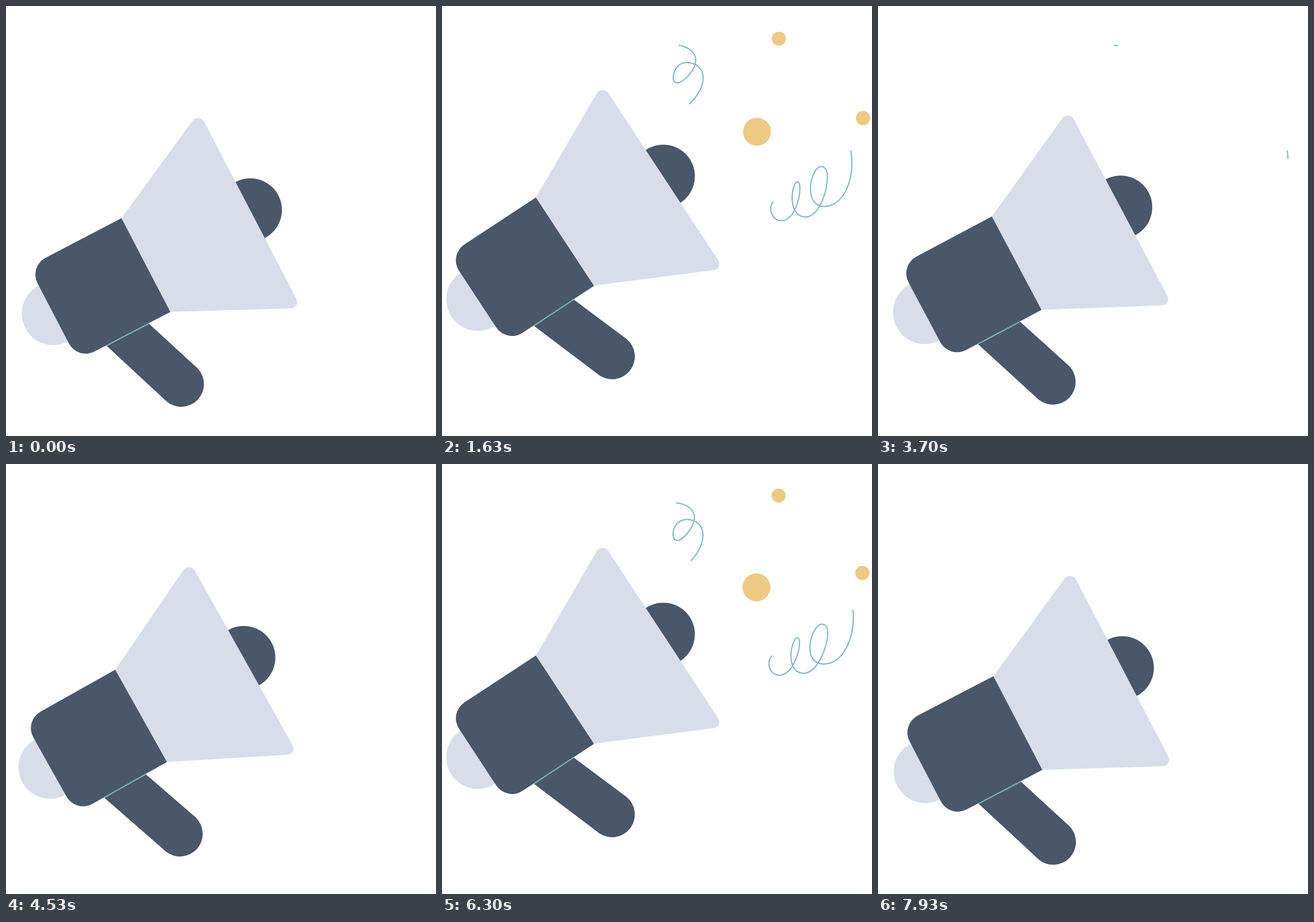
Recreate the animation shown at these times as an HTML page. Size 748x748 px, loop 8010 ms.

```html
<!DOCTYPE html>
<html lang="en">
<head>
<meta charset="utf-8">
<title>Megaphone</title>
<style>
  html, body { margin: 0; width: 100%; height: 100%; overflow: hidden; background: #fff; }
  svg { display: block; width: 100%; height: 100%; }
  .dark { fill: #4a5669; }
  .light { fill: #d8dde9; }
  .dot { fill: #edc985; }
  .ribbon { fill: none; stroke: #7db2c4; stroke-width: 2; }
  .seam { stroke: #7ab0b9; stroke-width: 2.2; }
</style>
</head>
<body>
<svg viewBox="0 0 748 748">
  <g id="horn">
    <circle class="light" cx="82.5" cy="535" r="55"/>
    <circle class="dark" cx="425" cy="354.7" r="55"/>
    <path class="dark" d="M175 591 L279.5 688 A39.5 39.5 0 0 0 333 630 L248 552 Z"/>
    <path class="dark" transform="translate(201 369) rotate(62.46)"
      d="M0 0 H184 V149 a33 33 0 0 1 -33 33 H33 a33 33 0 0 1 -33 -33 Z"/>
    <path class="seam" d="M174.5 591 L249 552"/>
    <path class="light" d="M201 369 L324.5 199.5 A11.8 11.8 0 0 1 344.5 201
      L505.5 510 A11.2 11.2 0 0 1 497 526 L286 532 Z"/>
  </g>
  <path id="curl" class="ribbon" pathLength="1" d="M433 168.5 C447 153 454 139 454 123
    C454 107 442 96.5 426 96.5 C411 96.5 402 109 402 122 C402 129 404 133 409 133
    C419 133 439 110 439 93 C439 79 425 69 407 67.5"/>
  <path id="spiral" class="ribbon" pathLength="1" d="M574 333 C567 342 568 350 570 355
    C573 363 579 367.5 587 367.5 C609 367 621 330 622 312 C622 305 621 302 618.5 302
    C613 302 607 319 607 333 C607 352 615 364 629 364 C653 364 671 318 671 294
    C671 284 667 278.5 661 278.5 C651 278.5 640 300 640 320 C640 338 649 348 664 348
    C697 348 719 304 715 254"/>
  <circle id="top" class="dot"/>
  <circle id="big" class="dot"/>
  <circle id="side" class="dot"/>
</svg>
<script>
const LOOP = 8010, STEPS = 160, CYCLE = 80;
const el = id => document.getElementById(id);
const span = (k, from, to) => Math.min(1, Math.max(0, (k - from) / (to - from)));
const cubic = u => u < .5 ? 4 * u ** 3 : 1 - 4 * (1 - u) ** 3;
const quad = u => u < .5 ? 2 * u * u : 1 - 2 * (1 - u) ** 2;
const quadOut = u => 1 - (1 - u) ** 2;
const wave = u => (1 - Math.cos(Math.PI * u)) / 2;

// Position, radius, float offset, then appear and vanish spans in steps
const dots = [
  { node: el('top'), x: 586, y: 57, r: 12.2, dx: -.6, dy: -2.6, show: [18.8, 25.8], hide: [62, 67.5] },
  { node: el('big'), x: 548, y: 219, r: 24.3, dx: -1.2, dy: -5.7, show: [20, 28], hide: [63, 70] },
  { node: el('side'), x: 732.4, y: 195.3, r: 12.4, dx: -1.6, dy: -7.4, show: [22, 30], hide: [66, 72.5] }
];
const ribbons = [
  { node: el('curl'), pivot: '400 128', turn: -1 },
  { node: el('spiral'), pivot: '672 305', turn: 1 }
];

// Two uneven steps in every 100 ms
function stepAt(t) {
  const k = 2 * Math.floor(t / 100) + (t % 100 >= 30 ? 1 : 0);
  return Math.min(k, STEPS - 1) % CYCLE;
}

function draw(k) {
  const lift = cubic(span(k, -.8, 27.2)) - cubic(span(k, 54.7, 81.1));
  el('horn').setAttribute('transform', `rotate(${-5.79 * lift} -174 722)`);

  const sway = 4.6 * Math.sin(2 * Math.PI * (k - 33) / 40) - 4.1;
  const head = quadOut(span(k, 18, 32));
  const tail = quad(span(k, 59, 76));
  for (const { node, pivot, turn } of ribbons) {
    node.setAttribute('transform', `rotate(${turn * sway} ${pivot})`);
    node.setAttribute('stroke-dasharray', `0 ${tail} ${Math.max(0, head - tail)} 2`);
    node.style.display = head > tail ? '' : 'none';
  }

  const rise = wave(span(k, 32, 40)) - wave(span(k, 40, 60));
  for (const d of dots) {
    const size = cubic(span(k, ...d.show)) - cubic(span(k, ...d.hide));
    d.node.setAttribute('cx', d.x + d.dx * rise);
    d.node.setAttribute('cy', d.y + d.dy * rise);
    d.node.setAttribute('r', Math.max(0, d.r * size));
  }
}

function tick() {
  draw(stepAt(performance.now() % LOOP));
  requestAnimationFrame(tick);
}
tick();
</script>
</body>
</html>
```
